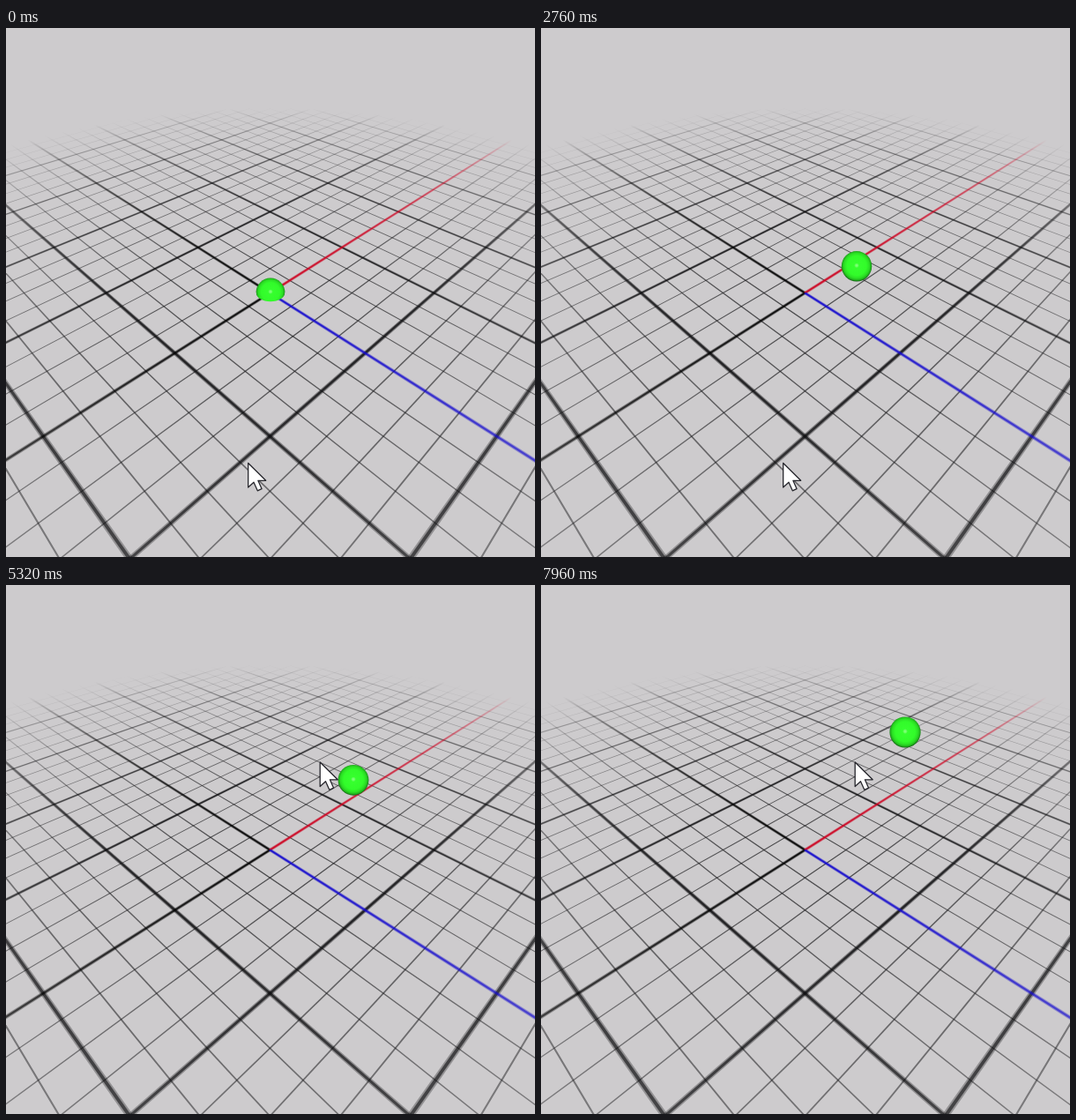
These frames come from a looping animation (600 by 600 pixels, 8 s). An HTML page with a canvas:

```html
<!DOCTYPE html>
<html lang="en">
<head>
<meta charset="utf-8">
<title>Ball above a grid</title>
<style>
  html, body { margin: 0; width: 100%; height: 100%; overflow: hidden; background: #cdcbcd; }
  canvas { position: absolute; left: 0; top: 0; }
</style>
</head>
<body>
<canvas id="grid" width="600" height="600"></canvas>
<canvas id="scene" width="600" height="600"></canvas>
<script>
const LOOP = 8000;
const CENTER_X = 299.4, CENTER_Y = 300.5;
const FOCAL = 300 / Math.tan(Math.PI / 6);
const DIST = Math.sqrt(250);
const SIN = 10 / DIST, COS = Math.sqrt(1 - SIN * SIN);
const REACH = 20;

const gridCtx = document.getElementById('grid').getContext('2d');
const ctx = document.getElementById('scene').getContext('2d');

const depth = (x, z) => DIST - (z - x) * Math.SQRT1_2 * COS;

function project(x, z) {
  const scale = FOCAL / depth(x, z) * Math.SQRT1_2;
  return [CENTER_X + (x + z) * scale, CENTER_Y + (z - x) * SIN * scale];
}

const fade = (x, z) => Math.max(0, 1 - Math.pow(Math.hypot(x, z) / REACH, 1.3));

// One ground line: a tapering strip whose opacity falls off away from the origin.
function groundLine(alongX, offset, from, to, rgb, strength, width) {
  if (to <= from) return;
  const at = (p, side = 0) => alongX ? [p, offset + side] : [offset + side, p];
  const half = p => (0.0022 * depth(...at(p)) + width) / 2;
  const start = project(...at(from)), end = project(...at(to));
  const dx = end[0] - start[0], dy = end[1] - start[1], len2 = dx * dx + dy * dy;
  const paint = gridCtx.createLinearGradient(...start, ...end);
  const steps = 24;
  for (let i = 0; i <= steps; i++) {
    const p = from + (to - from) * i / steps;
    const [x, y] = project(...at(p));
    const t = ((x - start[0]) * dx + (y - start[1]) * dy) / len2;
    const alpha = strength * fade(...at(p));
    paint.addColorStop(Math.min(1, Math.max(0, t)), `rgba(${rgb},${alpha.toFixed(4)})`);
  }
  gridCtx.fillStyle = paint;
  gridCtx.beginPath();
  for (const [p, side] of [[from, -1], [to, -1], [to, 1], [from, 1]])
    gridCtx.lineTo(...project(...at(p, side * half(p))));
  gridCtx.fill();
}

// A bold line with soft edges: a faint wide strip under a strong narrow one.
function softLine(alongX, offset, from, to, rgb) {
  groundLine(alongX, offset, from, to, rgb, 0.45, 0.1);
  groundLine(alongX, offset, from, to, rgb, 0.88, 0.04);
}

function drawGrid() {
  gridCtx.fillStyle = '#cdcbcd';
  gridCtx.fillRect(0, 0, 600, 600);
  const lines = (major, draw) => {
    for (let i = 1 - REACH; i < REACH; i++) {
      if (i === 0 || (i % 4 === 0) !== major) continue;
      const end = Math.sqrt(REACH * REACH - i * i);
      draw(false, i, -end, Math.min(end, i + 14));
      draw(true, i, Math.max(-end, i - 14), end);
    }
  };
  lines(false, (...span) => groundLine(...span, '25,25,27', 0.75, 0.01));
  lines(true, (...span) => softLine(...span, '10,10,12'));
  softLine(true, 0, -14, 0, '0,0,0');
  softLine(false, 0, -REACH, 0, '0,0,0');
  softLine(true, 0, 0, REACH, '205,0,30');
  softLine(false, 0, 0, 14, '18,8,205');
}

// time, x, y, radius
const path = [
  [0, 300, 300, 16.4],
  [430, 300, 300, 16.4],
  [1560, 328.5, 285, 16.8],
  [2760, 358, 270.3, 17.2],
  [3760, 384, 257, 17.5],
  [4100, 392.4, 252.6, 17.5],
  [5320, 394, 221.3, 17.4],
  [6600, 396.5, 190, 17.4],
  [7180, 397.4, 175.5, 17.4],
  [7960, 413, 167, 17.6],
  [8000, 413.8, 166.6, 17.6]
];

function ballAt(time) {
  const i = path.findIndex(p => p[0] > time);
  const a = path[i - 1], b = path[i];
  const k = (time - a[0]) / (b[0] - a[0]);
  return a.slice(1).map((v, n) => v + (b[n + 1] - v) * k);
}

function drawBall(time) {
  const [x, y, r] = ballAt(time);
  const height = (300 - y) / COS;
  ctx.save();
  if (height < r * COS) {
    // The ground hides whatever is still beneath it.
    const ring = Math.sqrt(r * r - height * height);
    const clip = new Path2D();
    clip.rect(0, 0, 600, y + height / COS);
    clip.ellipse(x, y + height * COS, ring, ring * SIN, 0, 0, 2 * Math.PI);
    ctx.clip(clip);
  }
  const paint = ctx.createRadialGradient(x, y - 1, 0, x, y - 0.6, r + 0.6);
  const stops = [[0, '#8cff84'], [0.08, '#6cff64'], [0.16, '#36ff2e'], [0.62, '#32fb2a'],
                 [0.8, '#2be024'], [0.91, '#20b41c'], [1, '#125c12']];
  for (const [at, color] of stops) paint.addColorStop(at, color);
  ctx.fillStyle = paint;
  ctx.beginPath();
  ctx.arc(x, y, r, 0, 2 * Math.PI);
  ctx.fill();
  ctx.restore();
}

const arrow = new Path2D('M0 0V27.5L6.3 21.7L10.6 31.3L15.4 29.2L11.2 19.8H20Z');

function drawCursor(time) {
  const k = Math.min(1, Math.max(0, (time - 3000) / 240));
  const ease = k * k * (3 - 2 * k);
  ctx.save();
  ctx.translate(274.7 + 81.5 * ease, 493.5 - 292.5 * ease);
  ctx.lineJoin = 'round';
  ctx.lineWidth = 1.3;
  ctx.fillStyle = '#fff';
  ctx.strokeStyle = '#26262c';
  ctx.fill(arrow);
  ctx.stroke(arrow);
  ctx.restore();
}

const origin = performance.now();

function render(now) {
  const time = Math.max(0, now - origin) % LOOP;
  ctx.clearRect(0, 0, 600, 600);
  drawBall(time);
  drawCursor(time);
  requestAnimationFrame(render);
}

drawGrid();
render(origin);
</script>
</body>
</html>
```
